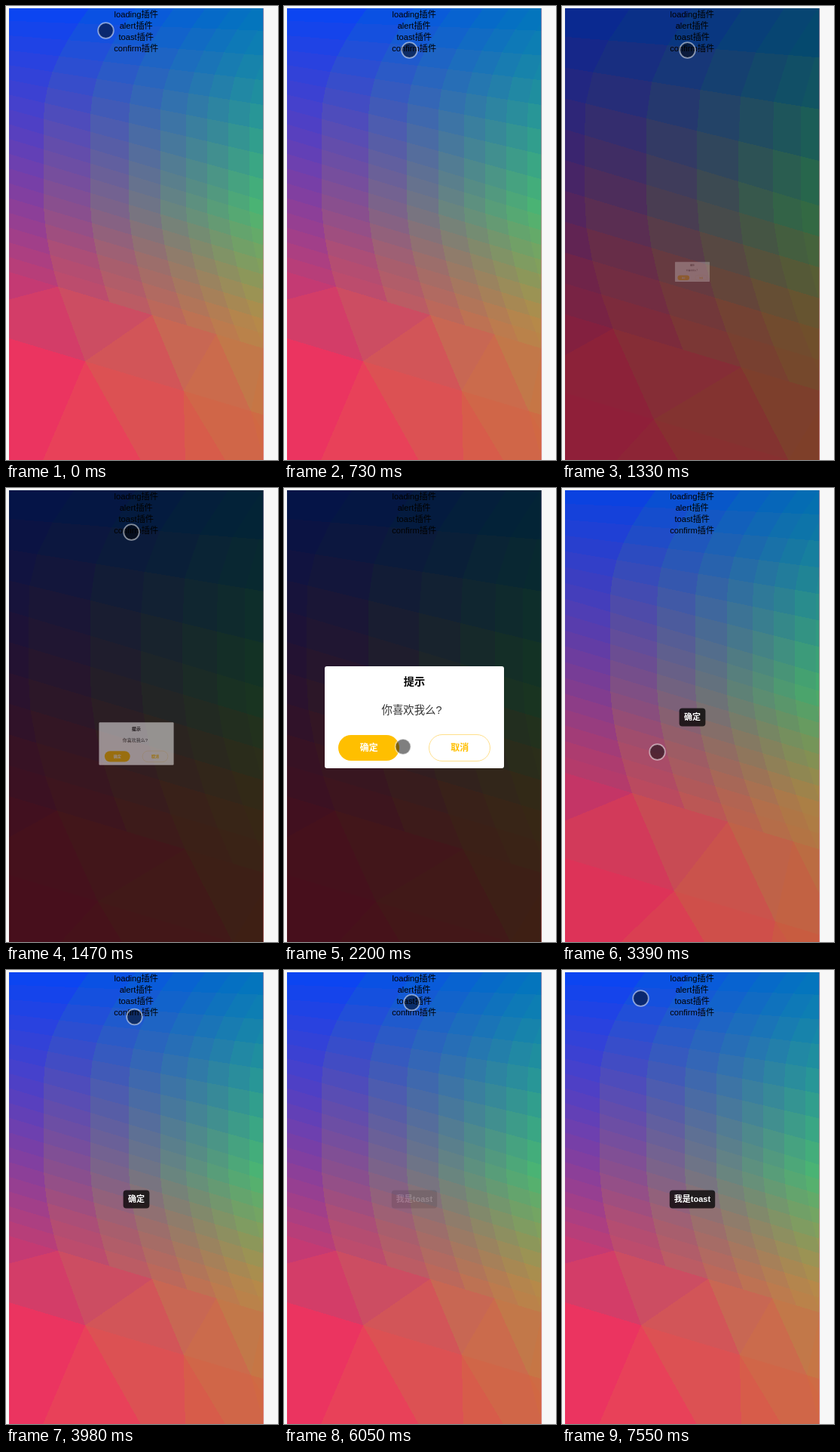
These frames come from a looping animation (361x601 px, 7.99 s). An HTML page:

```html
<!DOCTYPE html>
<html lang="zh">
<head>
<meta charset="utf-8">
<title>插件</title>
<style>
  html, body { margin: 0; width: 100%; height: 100%; overflow: hidden; background: #f7f7f7; }
  svg { display: block; width: 361px; height: 601px; }
  text { font-family: "Liberation Sans", "Noto Sans CJK SC", "Noto Sans CJK", sans-serif; text-anchor: middle; }
</style>
</head>
<body>
<svg id="stage" viewBox="0 0 361 601" xmlns="http://www.w3.org/2000/svg"></svg>
<script>
const LOOP = 7990, TICK = 148;
const LEFT = 4, RIGHT = 341, TOP = 3, BOTTOM = 601;
const stage = document.getElementById('stage');

const clamp = (v, a, b) => Math.min(b, Math.max(a, v));
const lerp = (a, b, p) => a + (b - a) * p;
const ramp = (v, a, b) => clamp((v - a) / (b - a), 0, 1);
const ease = p => p * p * (3 - 2 * p);

// Colours run down both edges and blend across.
const leftEdge = [[3, 8, 64, 250], [340, 190, 56, 120], [490, 238, 46, 98], [601, 246, 46, 98]];
const rightEdge = [[3, 0, 116, 190], [270, 72, 184, 114], [420, 180, 140, 72], [601, 212, 100, 66]];

function edgeColour(stops, y) {
  const i = Math.max(1, stops.findIndex(s => s[0] >= y));
  const [a, b] = [stops[i - 1], stops[i]];
  const p = ramp(y, a[0], b[0]);
  return [1, 2, 3].map(c => lerp(a[c], b[c], p));
}

function colourAt(x, y) {
  const a = edgeColour(leftEdge, y), b = edgeColour(rightEdge, y);
  const p = ramp(x, LEFT, RIGHT) ** 1.2;
  return `rgb(${a.map((v, c) => Math.round(lerp(v, b[c], p)))})`;
}

// A flat facet takes the colour found at the middle of its visible part.
function facet(...points) {
  const mean = (c, a, b) => points.reduce((sum, p) => sum + clamp(p[c], a, b), 0) / points.length;
  const list = points.map(p => p.map(v => v.toFixed(1)).join()).join(' ');
  return `<polygon points="${list}" fill="${colourAt(mean(0, LEFT, RIGHT), mean(1, TOP, BOTTOM))}"/>`;
}

const bend = y => y > 260 ? 148 * ((y - 260) / 341) ** 1.75
  : y < 150 ? 60 * ((150 - y) / 147) ** 2 : 0;

// Where a bent column meets a slanted row.
function node(column, row) {
  const slope = 0.3 * Math.min(1, row / 150);
  const x = column + bend(row + slope * (column - LEFT));
  return [x, row + slope * (x - LEFT)];
}

// Even, fine rows down to `mid`; below it wide cells cut into triangles.
function facetGrid(start, gap, count, mid, low) {
  const columns = [-120];
  for (let x = start; x < 430; x += Math.max(28, gap), gap *= 0.82) columns.push(x);
  const wide = columns.filter((x, i) => i % 2 || i === 0 || i === columns.length - 1);
  const rows = Array.from({ length: count + 1 }, (_, j) => mid * j / count).concat(low, 640);

  let out = '';
  for (let j = 0; j < rows.length - 1; j++) {
    const cols = j < count ? columns : wide;
    for (let i = 0; i < cols.length - 1; i++) {
      const a = node(cols[i], rows[j]), b = node(cols[i + 1], rows[j]);
      const c = node(cols[i + 1], rows[j + 1]), d = node(cols[i], rows[j + 1]);
      out += j < count ? facet(a, b, c, d) : facet(a, b, d) + facet(b, c, d);
    }
  }
  return out;
}

const label = (text, x, y, size, fill, weight = 400) =>
  `<text x="${x}" y="${y}" font-size="${size}" fill="${fill}" font-weight="${weight}">${text}</text>`;

const toast = (id, text, width) =>
  `<g id="${id}"><rect x="${173 - width / 2}" y="291.5" width="${width}" height="24" rx="4" fill="#000" fill-opacity=".75"/>
   ${label(text, 173, 307.3, 11, '#fff', 700)}</g>`;

stage.innerHTML = `
  <clipPath id="page"><rect x="4" y="3" width="337.5" height="598"/></clipPath>
  <rect width="361" height="601" fill="#f7f7f7"/>
  <rect x="341.5" y="3" width="1" height="598" fill="#dcdcdc"/>
  <g clip-path="url(#page)">
    <rect width="361" height="601" fill="${colourAt(LEFT, BOTTOM)}"/>
    <g shape-rendering="crispEdges">
      <g id="bright">${facetGrid(50, 62, 18, 352, 440)}</g>
      <g id="soft">${facetGrid(64, 62, 18, 377, 490)}</g>
      <g id="dim">${facetGrid(30, 82, 10, 408, 512)}</g>
    </g>
    ${['loading', 'alert', 'toast', 'confirm'].map((name, i) =>
      label(name + '插件', 172.7, 14.8 + 15.1 * i, 11.2, '#000')).join('')}
    <rect id="shade" x="4" y="3" width="338" height="598"/>
  </g>
  <g id="dialog">
    <rect x="54" y="236" width="238" height="135" rx="3" fill="#fff"/>
    ${label('提示', 173, 260.7, 14.2, '#000', 700)}
    ${label('你喜欢我么?', 169.5, 298.5, 14.4, '#333')}
    <rect x="72" y="327" width="81" height="34" rx="17" fill="#ffbf00"/>
    ${label('确定', 112.7, 348.4, 12, '#fff', 700)}
    <rect x="192.5" y="326.5" width="81" height="35" rx="17.5" fill="#fff" stroke="#ffe08a"/>
    ${label('取消', 233.2, 348.4, 12, '#ffbf00', 700)}
  </g>
  ${toast('answer', '确定', 34.8)}
  ${toast('notice', '我是toast', 60.4)}
  <circle id="pointer" r="10.3" fill="#000" fill-opacity=".5" stroke="#fff" stroke-opacity=".5" stroke-width="1.8"/>`;

// Pointer moves: first tick, last tick, goal, and how far the path arcs up.
const moves = [
  [0, 5, 166.5, 58.5, 14],
  [10, 15, 158, 342.5, 0],
  [16, 18, 126.5, 349.5, 0],
  [24, 27, 170.5, 62, 0],
  [28, 32, 169.5, 43, 0],
  [48, 51, 104.5, 37.5, 0]
];

function pointerAt(tick) {
  let x = 132.5, y = 32.5;
  for (const [from, to, goalX, goalY, arc] of moves) {
    const p = ease(ramp(tick, from, to));
    x = lerp(x, goalX, p);
    y = lerp(y, goalY, p) - arc * Math.sin(Math.PI * p);
  }
  return [x, y];
}

const el = id => document.getElementById(id);
const fade = (id, alpha) => el(id).setAttribute('opacity', alpha);

function render(time) {
  // The screen refreshes only about seven times a second.
  const tick = Math.floor((time + 30) / TICK);
  const pulse = (inA, inB, outA, outB) => ease(ramp(tick, inA, inB)) * (1 - ramp(tick, outA, outB));

  const ground = tick < 9 || tick > 23 ? 'bright' : tick > 20 ? 'soft' : 'dim';
  for (const id of ['bright', 'soft', 'dim']) el(id).style.display = id === ground ? '' : 'none';
  fade('shade', 0.7 * ramp(tick, 7.8, 9.9) * (1 - ramp(tick, 18, 23.5)));

  const scale = 0.1 + 0.9 * pulse(8, 13, 18, 20);
  el('dialog').setAttribute('transform',
    `translate(173 ${303.5 + 60 * (1 - scale)}) scale(${scale}) translate(-173 -303.5)`);
  fade('dialog', ramp(tick, 8, 12) * (1 - ramp(tick, 18, 20)));

  fade('answer', pulse(20, 23, 33, 36));
  fade('notice', pulse(40.4, 43, 60, 61));
  el('pointer').setAttribute('transform', `translate(${pointerAt(tick)})`);
}

function loop() {
  render(performance.now() % LOOP);
  requestAnimationFrame(loop);
}
loop();
</script>
</body>
</html>
```
